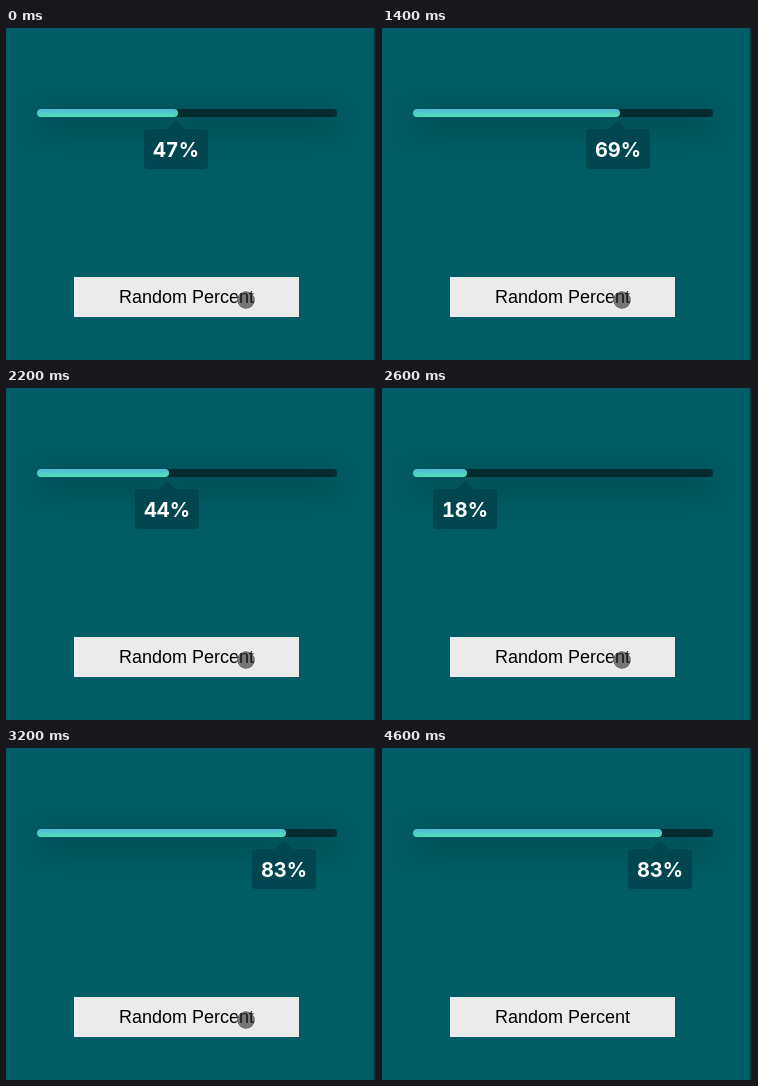
An HTML page that plays this animation: 370x332 px, repeating every 4.8 s.

```html
<!DOCTYPE html>
<html lang="en">
<head>
<meta charset="utf-8">
<title>Random percent bar</title>
<style>
  @property --p {
    syntax: "<integer>";
    inherits: true;
    initial-value: 47;
  }

  html, body {
    margin: 0;
    width: 100%;
    height: 100%;
    overflow: hidden;
  }

  .stage {
    position: relative;
    width: 370px;
    height: 332px;
    overflow: hidden;
    background: #005c65;
    animation: percent 4.8s step-end infinite;
  }

  .stage * {
    position: absolute;
    box-sizing: border-box;
  }

  .edge {
    right: 0;
    top: 0;
    width: 2px;
    height: 100%;
    background: #003238;
  }

  .track {
    left: 31px;
    top: 81px;
    width: 300px;
    height: 8px;
    border-radius: 4px;
    background: #042c30;
    box-shadow: 0 8px 30px rgba(0, 0, 0, .45);
  }

  .fill {
    left: 0;
    top: 0;
    width: calc(var(--p) * 3px);
    height: 8px;
    border-radius: 4px;
    background: linear-gradient(#53b9dc, #50e3b4);
  }

  .tip {
    left: calc(var(--p) * 3px - 3px);
    top: 101px;
    width: 64px;
    height: 40px;
    border-radius: 4px;
    background: #004650;
    color: #fff;
    font: 700 20px/42px Inter, sans-serif;
    font-variant-numeric: tabular-nums;
    text-align: center;
    white-space: nowrap;
    counter-reset: percent var(--p);
  }

  .tip::before {
    content: "";
    position: absolute;
    left: 23px;
    top: -8px;
    border: 9px solid transparent;
    border-top: 0;
    border-bottom: 8px solid #004650;
  }

  .tip::after {
    content: counter(percent) "%";
  }

  .button {
    left: 68px;
    top: 249px;
    width: 225px;
    height: 40px;
    background: #ebebeb;
    color: #000;
    font: 18px/40px "Liberation Sans", Arial, sans-serif;
    text-align: center;
  }

  .pointer {
    left: 230px;
    top: 262px;
    width: 20px;
    height: 20px;
    border: 1px solid rgba(255, 255, 255, .5);
    border-radius: 50%;
    background: rgba(40, 40, 40, .6);
    background-clip: padding-box;
    animation: leave 4.8s step-end infinite;
  }

  @keyframes percent {
    0%      { --p: 47; }
    8.333%  { --p: 56; }
    16.666% { --p: 66; }
    29.166% { --p: 69; }
    33.333% { --p: 41; }
    37.5%   { --p: 38; }
    45.833% { --p: 44; }
    50%     { --p: 18; }
    58.333% { --p: 67; }
    62.5%   { --p: 3; }
    66.666%, 100% { --p: 83; }
  }

  @keyframes leave {
    0% { visibility: visible; }
    75%, 100% { visibility: hidden; }
  }
</style>
</head>
<body>
<div class="stage">
  <div class="edge"></div>
  <div class="track"><div class="fill"></div></div>
  <div class="tip"></div>
  <div class="button">Random Percent</div>
  <div class="pointer"></div>
</div>
</body>
</html>
```
